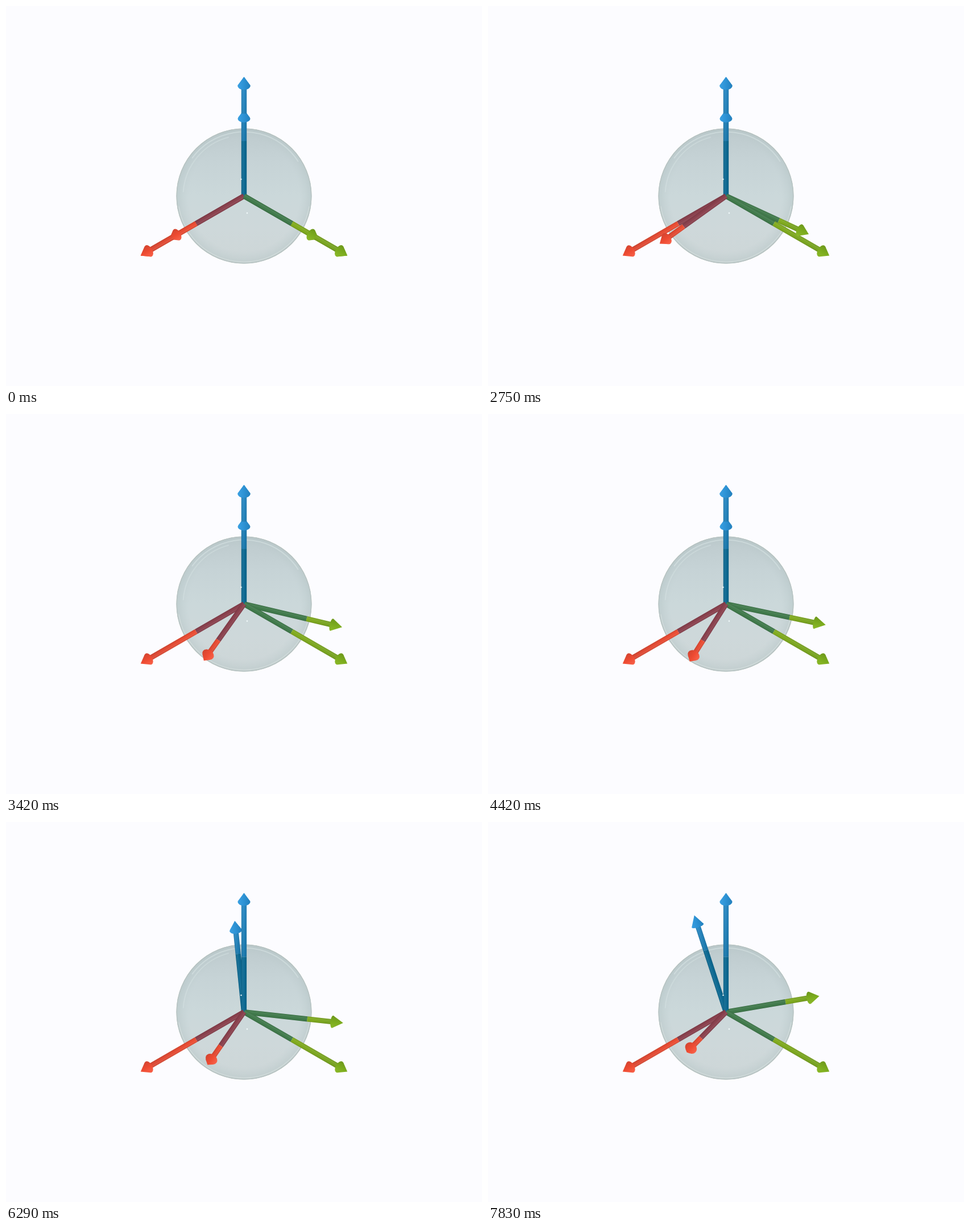
These frames come from a looping animation (837x669 px, 8 s). An HTML page with a canvas:

```html
<!DOCTYPE html>
<html lang="en">
<head>
<meta charset="utf-8">
<title>Rotating axes</title>
<style>
  html, body { margin: 0; width: 100%; height: 100%; overflow: hidden; background: #fcfcff; }
  canvas { display: block; }
</style>
</head>
<body>
<canvas id="stage" width="837" height="669"></canvas>
<script>
const ctx = document.getElementById('stage').getContext('2d');
const LOOP = 8000;
const CX = 418.5, CY = 334.5;
const SPHERE = 119, OUTER = 257, INNER = 186.5;
const HEAD = 20, HEAD_R = 11, SHAFT_R = 4.6;
const TILT = 25 * Math.PI / 180;

// Time and share of the full turn.
const YAW = [[2500, 0], [3130, .63], [3330, .84], [3540, 1]];
const ROLL = [[5940, 0], [6290, .281], [6790, .79], [7000, 1]];

const BLUE = { near: '#1b79ad', far: '#2b8bc6', inside: '#0d6a93', head: ['#3aa0e2', '#2d92d4', '#2380bd'] };
const RED = { near: '#ee4d33', far: '#dc4a36', inside: '#8b414e', head: ['#f8624a', '#ee4b32', '#d34430'] };
const GREEN = { near: '#83ad1e', far: '#78a424', inside: '#417b4c', head: ['#8bb829', '#7cac1e', '#6d981b'] };

function sample(steps, t) {
  if (t <= steps[0][0]) return steps[0][1];
  for (let i = 1; i < steps.length; i++) {
    const [t0, v0] = steps[i - 1], [t1, v1] = steps[i];
    if (t < t1) return v0 + (v1 - v0) * (t - t0) / (t1 - t0);
  }
  return steps[steps.length - 1][1];
}

// Turn about the vertical axis, then about the fixed red axis.
function turn([x, y, z], yaw, roll) {
  const c = Math.cos(yaw), s = Math.sin(yaw), d = Math.cos(roll), e = Math.sin(roll);
  const x1 = x * c - y * s, y1 = x * s + y * c;
  return [x1, y1 * d - z * e, y1 * e + z * d];
}

// Isometric view of a unit direction: screen angle, foreshortening, depth.
function project([x, y, z]) {
  const right = (y - x) / Math.SQRT2;
  const down = (x + y - 2 * z) / Math.sqrt(6);
  return {
    angle: Math.atan2(down, right),
    scale: Math.hypot(right, down),
    depth: (x + y + z) / Math.sqrt(3)
  };
}

function along(view, draw) {
  ctx.save();
  ctx.translate(CX, CY);
  ctx.rotate(view.angle);
  draw();
  ctx.restore();
}

function gradient(x0, y0, x1, y1, stops) {
  const g = ctx.createLinearGradient(x0, y0, x1, y1);
  stops.forEach((color, i) => g.addColorStop(i / (stops.length - 1), color));
  return g;
}

function drawShaft({ view, length, color }, from = 0) {
  along(view, () => {
    const a = from * view.scale, b = (length - HEAD) * view.scale, edge = SPHERE * view.scale;
    const bar = (x0, x1, fill) => {
      ctx.fillStyle = fill;
      ctx.fillRect(x0, -SHAFT_R, x1 - x0, 2 * SHAFT_R);
    };
    if (a < edge) bar(a, edge, color.inside);
    bar(Math.max(a, edge), b, gradient(edge, 0, b, 0, [color.near, color.far]));
    bar(a, b, gradient(0, -SHAFT_R, 0, SHAFT_R,
      ['rgba(0,0,0,.1)', 'rgba(255,255,255,.06)', 'rgba(0,0,0,0)', 'rgba(0,0,0,.12)']));
  });
}

function drawHead({ view, length, color }) {
  along(view, () => {
    const base = (length - HEAD) * view.scale;
    const tip = HEAD * view.scale;
    const flat = HEAD_R * Math.abs(view.depth);
    ctx.translate(base, 0);
    // Light comes from the upper left of the screen.
    const side = Math.sin(view.angle) - Math.cos(view.angle) > 0 ? 1 : -1;
    const lit = Math.abs(view.angle + Math.PI / 2) < 1 ? -1 : -side;
    ctx.fillStyle = gradient(0, lit * HEAD_R, 0, -lit * HEAD_R, color.head);
    ctx.beginPath();
    ctx.ellipse(0, 0, flat, HEAD_R, 0, 0, 2 * Math.PI);
    ctx.fill();
    if (tip > flat) {
      const touch = Math.acos(flat / tip);
      const x = flat * Math.cos(touch), y = HEAD_R * Math.sin(touch);
      ctx.beginPath();
      ctx.moveTo(tip, 0);
      ctx.lineTo(x, y);
      ctx.lineTo(x, -y);
      ctx.fill();
    }
  });
}

function disc(x, y, r, fill) {
  ctx.fillStyle = fill;
  ctx.beginPath();
  ctx.arc(x, y, r, 0, 2 * Math.PI);
  ctx.fill();
}

function arc(r, from, to, width, color) {
  ctx.strokeStyle = color;
  ctx.lineWidth = width;
  ctx.beginPath();
  ctx.arc(CX, CY, r, from * Math.PI, to * Math.PI);
  ctx.stroke();
}

function drawSphere() {
  disc(CX, CY, SPHERE, gradient(0, CY - SPHERE, 0, CY + SPHERE,
    ['#bdcacd', '#c6d3d6', '#cbd8da', '#ced8da', '#cdd6d7']));
  const rim = ctx.createRadialGradient(CX, CY, SPHERE * .82, CX, CY, SPHERE);
  rim.addColorStop(0, 'rgba(190,204,206,0)');
  rim.addColorStop(1, 'rgba(180,196,197,.55)');
  disc(CX, CY, SPHERE, rim);
  arc(SPHERE - .6, 0, 2, 1.2, '#b7c2c0');
  arc(SPHERE - 3, .05, .95, 1.5, 'rgba(222,230,228,.5)');
  arc(107, 1.02, 1.42, 2, 'rgba(218,231,231,.4)');
  arc(113, 1.2, 1.82, 2, 'rgba(220,232,232,.5)');
}

const AXES = [[[0, 0, 1], BLUE], [[1, 0, 0], RED], [[0, 1, 0], GREEN]];

function render(t) {
  const yaw = TILT * sample(YAW, t), roll = TILT * sample(ROLL, t);
  const inner = AXES.map(([dir, color]) => ({ view: project(turn(dir, yaw, roll)), length: INNER, color }));
  const outer = AXES.map(([dir, color]) => ({ view: project(dir), length: OUTER, color }));
  const arrows = [...inner, ...outer].sort((a, b) => a.view.depth - b.view.depth);

  ctx.fillStyle = '#fcfcff';
  ctx.fillRect(0, 0, 837, 669);
  drawSphere();
  arrows.forEach(arrow => drawShaft(arrow));
  arrows.forEach(drawHead);

  // While two arrows coincide, the long shaft hides the point of the short one.
  outer.forEach((arrow, i) => {
    if (Math.abs(arrow.view.angle - inner[i].view.angle) < .02) {
      drawShaft(arrow, INNER - 9);
      drawHead(arrow);
    }
  });

  disc(413.5, 305, 1.2, '#f4fbfc');
  disc(424, 364.5, 1.2, '#f4fbfc');
}

const start = performance.now();
function tick() {
  render((performance.now() - start) % LOOP);
  requestAnimationFrame(tick);
}
tick();
</script>
</body>
</html>
```
